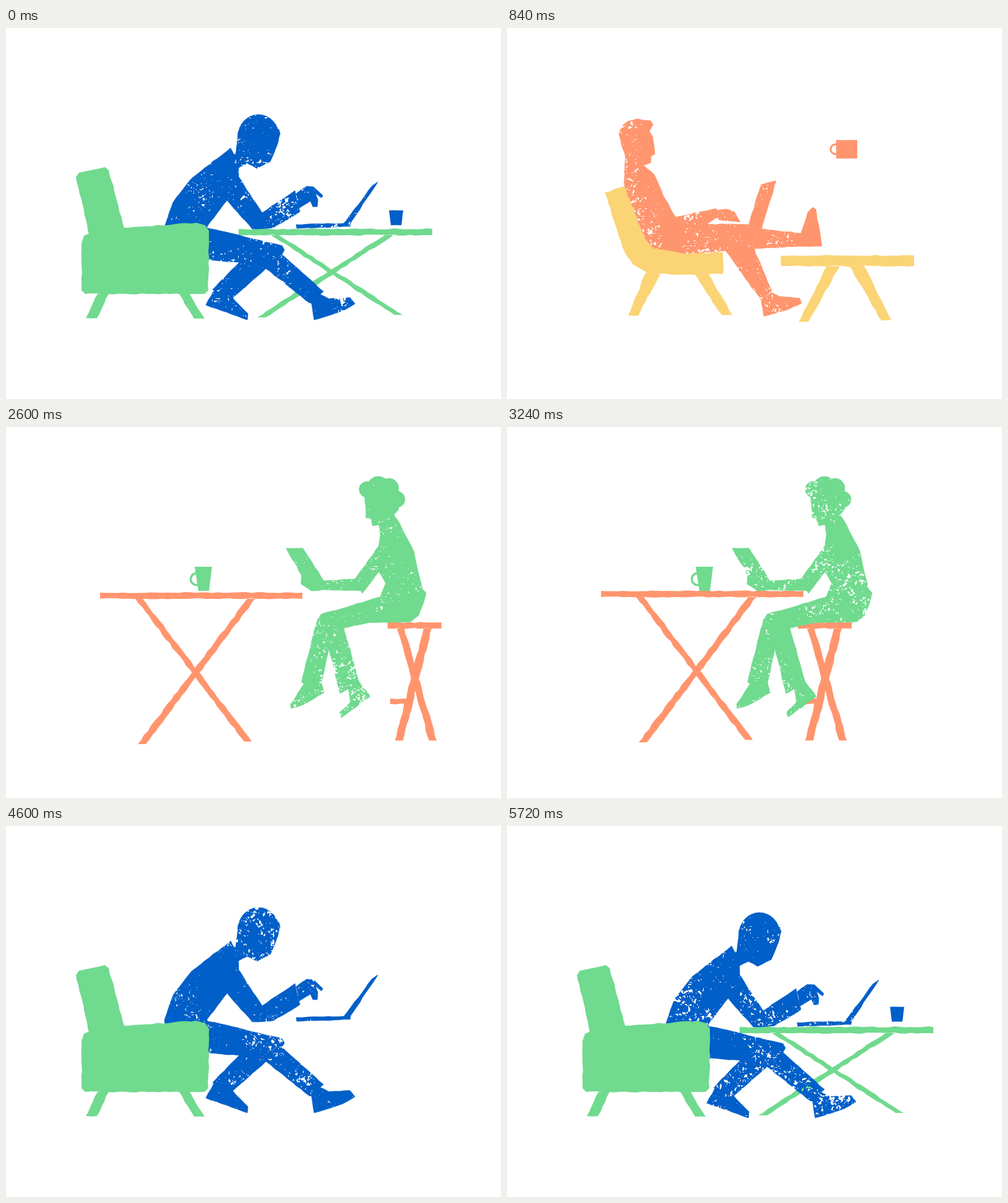
Animation, 800 px wide and 600 px high, one loop 5760 ms. Source, as an HTML page with a canvas:

```html
<!DOCTYPE html>
<html lang="en">
<head>
<meta charset="utf-8">
<title>People at work</title>
<style>
html, body { margin: 0; width: 100%; height: 100%; overflow: hidden; background: #fff; }
canvas { display: block; width: 800px; height: 600px; }
</style>
</head>
<body>
<canvas id="stage" width="800" height="600"></canvas>
<script>
const LOOP = 5760, STEP = 40, GRAIN_HOLD = 120;
const BLUE = '#005fc8', GREEN = '#70da8e', ORANGE = '#ff956e', YELLOW = '#fad475';

const ctx = document.getElementById('stage').getContext('2d');
const layer = document.createElement('canvas');
layer.width = 800;
layer.height = 600;
const lctx = layer.getContext('2d');

function seeded(seed) {
  return () => {
    seed = (seed + 0x6D2B79F5) | 0;
    let r = Math.imul(seed ^ (seed >>> 15), 1 | seed);
    r = (r + Math.imul(r ^ (r >>> 7), 61 | r)) ^ r;
    return ((r ^ (r >>> 14)) >>> 0) / 4294967296;
  };
}
const rnd = seeded(11);

// Something that slides from an offset to rest, built from hand-cut shapes.
class Item {
  constructor(color, rough, motion) {
    Object.assign(this, { color, rough, dx: 0, dy: 0, paths: [] }, motion);
  }

  // Long edges are split and nudged along their normal.
  poly(text) {
    const pts = text.split(' ').map(p => p.split(',').map(Number));
    const path = new Path2D();
    pts.forEach(([x, y], i) => {
      const [u, v] = pts[(i + 1) % pts.length];
      const len = Math.hypot(u - x, v - y), n = Math.max(1, Math.round(len / 9));
      if (i) path.lineTo(x, y); else path.moveTo(x, y);
      for (let k = 1; k < n; k++) {
        const d = (rnd() * 2 - 1) * this.rough / len, f = k / n;
        path.lineTo(x + (u - x) * f - (v - y) * d, y + (v - y) * f + (u - x) * d);
      }
    });
    path.closePath();
    this.paths.push(path);
    return this;
  }

  box(x, y, w, h) {
    return this.poly(`${x},${y} ${x + w},${y} ${x + w},${y + h} ${x},${y + h}`);
  }

  // Slanted bar with level ends.
  strut(x, y, u, v, w) {
    return this.poly(`${x},${y} ${x + w},${y} ${u + w},${v} ${u},${v}`);
  }

  oval(x, y, rx, ry = rx) {
    const path = new Path2D();
    path.ellipse(x, y, rx, ry, 0, 0, Math.PI * 2);
    this.paths.push(path);
    return this;
  }

  handle(x, y, r, w) {
    this.ring = { x, y, r, w };
    return this;
  }

  fill(c) {
    c.fillStyle = c.strokeStyle = this.color;
    c.lineJoin = 'round';
    c.lineWidth = 0.8;
    for (const p of this.paths) {
      c.fill(p);
      if (this.grain) c.stroke(p);
    }
    if (this.ring) {
      c.lineWidth = this.ring.w;
      c.beginPath();
      c.arc(this.ring.x, this.ring.y, this.ring.r, Math.PI * 0.4, Math.PI * 1.6);
      c.stroke();
    }
  }
}

const furniture = (color, motion) => new Item(color, 1, motion);
const mug = (color, motion) => new Item(color, 0.2, motion);
const person = (color, motion) => new Item(color, 0.6, { grain: true, ...motion });

// Armchair, typist, trestle table
const armchair = furniture(GREEN, { start: 3938, dur: 510, dx: -98 });
armchair.poly('113,241 118,234 160,225 166,230 191,323 191,345 137,345');
armchair.poly('137,331 191,323 308,315 322,319 328,328 327,424 321,430 128,430 122,424 122,348 126,336');
armchair.strut(148, 430, 129, 469, 18);
armchair.strut(280, 430, 304, 470, 17);

const trestle = furniture(GREEN, { start: 5010, dur: 510, dx: 150 });
trestle.box(376, 325, 313, 10);
trestle.strut(428, 335, 628, 464, 13);
trestle.strut(612, 335, 406, 468, 14);

const tumbler = mug(BLUE, { start: 5256, dur: 510, dy: -130 });
tumbler.poly('619,295 642,295 639,319 622,319');

const typist = person(BLUE, { start: 4170, dur: 510, dy: -137 });
typist.oval(408, 175, 33, 35);
typist.poly('371,207 375,168 441,164 443,171 434,200 427,216 405,227 390,219 376,226');
typist.poly('363,194 300,243 270,282 256,322 258,335 325,335 325,321 358,278 376,240 376,205 368,204');
typist.poly('374,238 414,299 467,263 475,297 432,323 398,325 357,278 350,255');
typist.poly('469,268 486,256 497,257 512,271 510,275 500,267 504,278 503,289 496,289 492,280 474,291');
typist.poly('320,322 446,352 450,359 446,366 513,426 491,445 420,389 377,379 320,375');
typist.poly('377,379 400,365 420,389 366,437 334,423');
typist.poly('506,430 522,438 556,436 564,446 545,457 498,472 494,446 488,440');
typist.poly('366,436 391,462 390,472 323,448 336,424');
typist.poly('469,318 546,316 592,255 601,249 557,315 556,321 470,324');

// Lounge chair, reader with feet up, low table
const lounge = furniture(YELLOW, { start: 160, dur: 480, dy: 123 });
lounge.poly('158,266 190,256 212,315 225,343 235,356 290,365 349,363 349,398 230,398 203,382 190,362');
lounge.strut(224, 396, 196, 465, 17);
lounge.poly('303,398 326,398 364,464 347,464');
lounge.poly('224,396 248,398 211,465');

const lowTable = furniture(YELLOW, { start: 244, dur: 714, dy: 121 });
lowTable.box(443, 360, 215, 17);
lowTable.poly('517,377 538,377 487,467 471,468');
lowTable.poly('553,377 577,377 621,464 605,465');

const squareMug = mug(ORANGE, { start: 683, dur: 510, dy: -190 });
squareMug.box(532, 330, 34, 30).handle(531, 345, 8, 3);

const lounger = person(ORANGE, { start: 210, dur: 510, dy: -111 });
lounger.poly('192,211 181,172 185,159 195,151 210,147 232,150 236,156 230,167 235,175 239,204 233,207 232,218 221,222 205,235');
lounger.poly('192,208 221,222 238,237 252,270 273,307 330,345 300,366 240,361 225,345 195,275 189,250');
lounger.poly('262,308 338,292 343,305 300,330 280,350');
lounger.poly('338,295 355,293 368,298 377,314 342,310');
lounger.poly('342,317 391,318 410,254 435,247 411,326 342,328');
lounger.poly('270,315 345,318 475,332 473,353 398,357 285,366');
lounger.poly('475,333 486,298 494,290 499,293 509,353 473,353');
lounger.poly('350,355 396,350 428,425 411,440 385,405');
lounger.poly('428,428 440,434 473,437 476,445 455,455 415,466 411,438');

// Tall table, stool, tablet reader
const tallTable = furniture(ORANGE, { start: 1950, dur: 720, dy: 118, show: 1840 });
tallTable.box(152, 265, 327, 10);
tallTable.strut(209, 275, 385, 506, 12);
tallTable.strut(390, 275, 213, 510, 13);

const taperMug = mug(GREEN, { start: 1960, dur: 600, dy: -98, show: 1840 });
taperMug.poly('305,226 333,226 328,265 311,265').handle(308, 246, 9.5, 3.5);

const stool = furniture(ORANGE, { start: 2480, dur: 480, dx: 172 });
stool.box(470, 316, 87, 10);
stool.strut(485, 326, 537, 507, 12);
stool.strut(528, 326, 482, 507, 13);
stool.box(474, 439, 28, 9);

const reader = person(GREEN, { start: 2400, dur: 480, dx: 141 });
reader.oval(495, 101, 13).oval(513, 98, 18).oval(530, 99, 16).oval(543, 117, 13);
reader.poly('491,110 540,105 546,133 538,142 548,157 518,180 514,158 504,160 499,147 493,147');
reader.poly('518,158 548,157 570,200 584,262 590,268 584,290 578,305 565,315 500,316 525,253 514,234 514,192');
reader.poly('514,192 530,215 514,234 487,269 485,265 425,263 420,249 475,246');
reader.poly('364,196 391,196 425,249 425,263 405,265 388,254 389,240');
reader.poly('420,303 520,274 560,285 560,315 500,316 457,325 435,340 413,318');
reader.poly('415,310 440,320 433,358 421,413 425,430 389,413 398,375');
reader.poly('457,324 482,412 451,431 433,358 430,320');
reader.poly('420,412 425,430 390,450 372,455 371,448 394,414');
reader.poly('482,412 500,436 453,470 451,461 468,445 464,420');

// Items are listed back to front.
const scenes = [
  { from: 3920, to: LOOP + 160, items: [trestle, tumbler, typist, armchair] },
  { from: 160, to: 1800, items: [lounger, lounge, lowTable, squareMug] },
  { from: 1840, to: 3920, items: [tallTable, taperMug, stool, reader] }
];

// Repeating tile of fine specks gathered in loose patches.
function grainTile(size) {
  const noise = cell => {
    const n = size / cell, grid = Float32Array.from({ length: n * n }, rnd);
    return (x, y) => {
      const gx = x / cell, gy = y / cell, i = Math.floor(gx), j = Math.floor(gy);
      const fx = gx - i, fy = gy - j;
      const at = (a, b) => grid[(b % n) * n + a % n];
      const top = at(i, j) * (1 - fx) + at(i + 1, j) * fx;
      const low = at(i, j + 1) * (1 - fx) + at(i + 1, j + 1) * fx;
      return top * (1 - fy) + low * fy;
    };
  };
  const fine = noise(2), mid = noise(4), patch = noise(32);
  const c = document.createElement('canvas');
  c.width = c.height = size;
  const g = c.getContext('2d'), img = g.createImageData(size, size);
  for (let y = 0, k = 3; y < size; y++) {
    for (let x = 0; x < size; x++, k += 4) {
      const score = (fine(x, y) + mid(x, y)) / 2;
      const limit = 1.05 - 0.5 * patch(x, y);
      img.data[k] = 255 * Math.min(1, Math.max(0, (score - limit) * 12 + 0.5));
    }
  }
  g.putImageData(img, 0, 0);
  return c;
}
const grain = lctx.createPattern(grainTile(512), 'repeat');

const ease = p => (1 - Math.cos(Math.PI * Math.min(1, Math.max(0, p)))) / 2;

function drawGrained(item, x, y, t) {
  const next = seeded(Math.floor(t / GRAIN_HOLD) * 97 + 5);
  const ox = Math.floor(next() * 512), oy = Math.floor(next() * 512);
  lctx.setTransform(1, 0, 0, 1, 0, 0);
  lctx.globalCompositeOperation = 'source-over';
  lctx.clearRect(0, 0, 800, 600);
  lctx.translate(x, y);
  item.fill(lctx);
  lctx.globalCompositeOperation = 'destination-out';
  lctx.translate(-ox, -oy);
  lctx.fillStyle = grain;
  lctx.fillRect(ox - 300, oy - 300, 1400, 1200);
  ctx.drawImage(layer, 0, 0);
}

function draw(t) {
  ctx.fillStyle = '#fff';
  ctx.fillRect(0, 0, 800, 600);
  for (const scene of scenes) {
    const now = t + LOOP < scene.to ? t + LOOP : t;
    if (now < scene.from || now >= scene.to) continue;
    for (const item of scene.items) {
      if (now < (item.show || item.start - STEP / 2)) continue;
      const left = 1 - ease((now - item.start) / item.dur);
      const x = item.dx * left, y = item.dy * left;
      if (item.grain) {
        drawGrained(item, x, y, t);
      } else {
        ctx.save();
        ctx.translate(x, y);
        item.fill(ctx);
        ctx.restore();
      }
    }
  }
}

const begin = performance.now();
function tick() {
  const t = (performance.now() - begin) % LOOP;
  draw(Math.floor(t / STEP) * STEP);
  requestAnimationFrame(tick);
}
tick();
</script>
</body>
</html>
```
